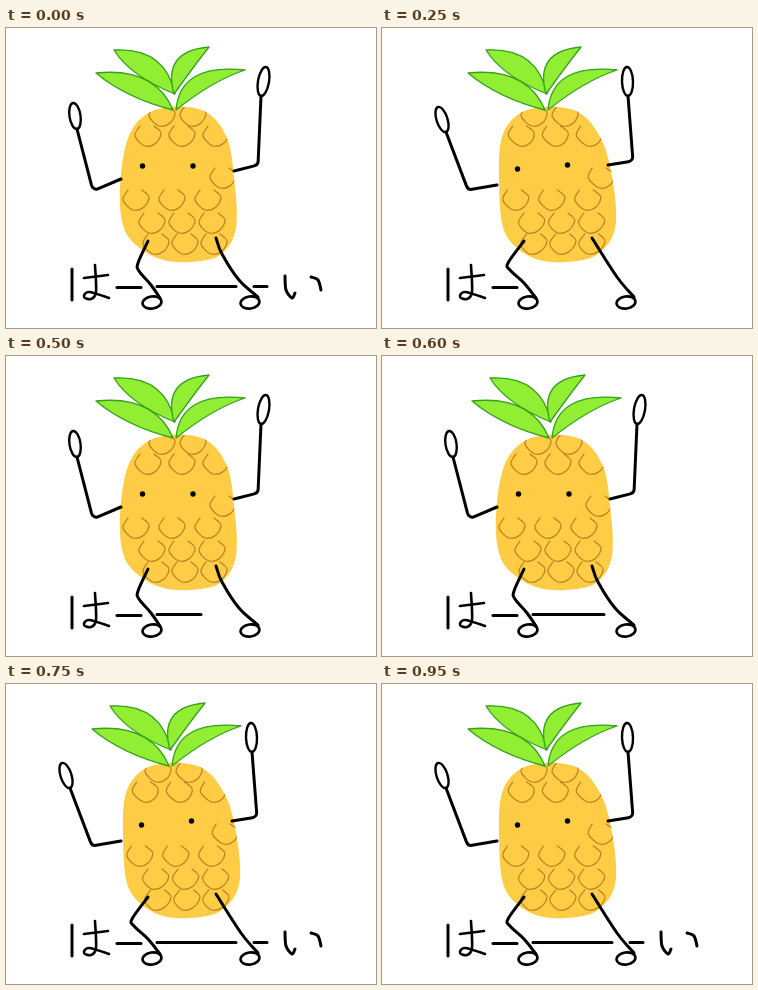
Recreate the animation shown at these times as an HTML page with a canvas. Size 370 px wide and 300 px high, loop 1000 ms.

```html
<!DOCTYPE html>
<html lang="ja">
<head>
<meta charset="utf-8">
<title>はーい</title>
<style>
html, body { margin: 0; width: 100%; height: 100%; overflow: hidden; background: #fff; }
canvas { display: block; }
</style>
</head>
<body>
<canvas id="stage" width="370" height="300" role="img" aria-label="はーい"></canvas>
<script>
const ctx = document.getElementById('stage').getContext('2d');
ctx.lineCap = ctx.lineJoin = 'round';

const INK = '#000', SKIN = '#ffcc46', SCALE = '#b98221', LEAF = '#92ee32', RIM = '#35a01f';

const points = s => s.split(' ').map(p => p.split(',').map(Number));

// Smooth curve through every point
function curve(pts, closed) {
  const n = pts.length;
  const at = i => closed ? pts[(i + n) % n] : pts[Math.max(0, Math.min(n - 1, i))];
  ctx.beginPath();
  ctx.moveTo(...pts[0]);
  for (let i = 0; i < (closed ? n : n - 1); i++) {
    const [a, b, c, d] = [at(i - 1), at(i), at(i + 1), at(i + 2)];
    ctx.bezierCurveTo(b[0] + (c[0] - a[0]) / 6, b[1] + (c[1] - a[1]) / 6,
      c[0] - (d[0] - b[0]) / 6, c[1] - (d[1] - b[1]) / 6, c[0], c[1]);
  }
}
function stroke(width = 3, color = INK) {
  ctx.lineWidth = width;
  ctx.strokeStyle = color;
  ctx.stroke();
}
function fill(color) {
  ctx.fillStyle = color;
  ctx.fill();
}
function line(s, width, color) {
  curve(points(s));
  stroke(width, color);
}
function oval(x, y, rx, ry, tilt = 0) {
  ctx.beginPath();
  ctx.ellipse(x, y, rx, ry, tilt, 0, 7);
}

// Leaning shifts the top to the left and the belly to the right
const lean = sway => ([x, y]) => [x - sway * 4 * Math.cos((y - 80) * Math.PI / 100), y];

const body = points('165,79 138,88 121,113 114,160 117,197 130,217 154,231 183,234 214,227 230,200 228,150 221,110 200,84');
const scale = points('-8,-9 -13,1 -3,11 8,8 13,-2 6,-9');
// Rows of scales: first x, y, spacing, count
const rows = [[156, 87, 31, 2], [142, 107, 34, 3], [217, 149, 0, 1], [130, 171, 36, 3], [146, 194, 30, 3], [150, 215, 29, 3]];

function drawBody(sway) {
  const bend = lean(sway);
  ctx.save();
  curve(body.map(bend), true);
  fill(SKIN);
  ctx.clip();
  for (const [x0, y0, gap, count] of rows)
    for (let i = 0; i < count; i++) {
      curve(scale.map(([x, y]) => bend([x0 + i * gap + x, y0 + y])));
      stroke(1.2, SCALE);
    }
  ctx.restore();
  for (const [x, y] of [[136.5 - sway, 138 + 3 * sway], [187 - 1.5 * sway, 138 - sway]]) {
    oval(x, y, 2.7, 2.7);
    fill(INK);
  }
}

// Pointed leaf from tip to base, one bend for each edge
function leaf(tip, base, upper, lower) {
  ctx.beginPath();
  ctx.moveTo(...tip);
  ctx.quadraticCurveTo(...upper, ...base);
  ctx.quadraticCurveTo(...lower, ...tip);
  fill(LEAF);
  stroke(1.3, RIM);
}
function drawLeaves(sway) {
  ctx.save();
  ctx.translate(-4 * sway, 0);
  leaf([108, 22], [169, 66], [159, 19], [124, 48]);
  leaf([203, 19], [168, 66], [156, 23], [188, 38]);
  leaf([90, 45], [167, 82], [149, 39], [120, 70]);
  leaf([239, 42], [170, 82], [174, 35], [206, 53]);
  ctx.restore();
}

function arm(shoulder, elbow, wrist, tip) {
  ctx.beginPath();
  ctx.moveTo(...shoulder);
  ctx.arcTo(...elbow, ...wrist, 5);
  ctx.lineTo(...wrist);
  stroke();
  const dx = tip[0] - wrist[0], dy = tip[1] - wrist[1];
  oval(wrist[0] + dx / 2, wrist[1] + dy / 2, Math.hypot(dx, dy) / 2, 5.5, Math.atan2(dy, dx));
  stroke(2.4);
}

function drawLimbs(sway) {
  if (sway) {
    arm([115, 157], [86, 162], [64, 104], [56, 79]);
    arm([226, 137], [251, 133], [246, 68], [245, 39]);
    line('142,213 126,235 128,242 142,255 154,270');
    line('210,210 235,249 252,269');
  } else {
    arm([115, 151], [87, 163], [71, 101], [67, 75]);
    arm([228, 143], [252, 137], [255, 68], [260, 39]);
    line('142,213 132,235 133,243 145,257 154,270');
    line('210,210 216,226 233,252 252,269');
  }
  for (const x of [146, 244]) {
    oval(x, 274.5, 9.5, 6, -0.15);
    stroke(2.6);
  }
}

// The word is written during the loop and stands complete at its turn
function drawWord(t) {
  if (t < 100) return;
  line('66,241 66,272');
  line('78,250 102,247', 2.6);
  line('89,237 90,264 85,271 78,269 83,264 103,270', 2.6);
  const end = t < 200 ? 0 : Math.max(136, 60 + 0.27 * t);
  for (const [a, b, y] of [[111, 135, 259.5], [151, 230, 258.5], [248, 261, 258.5]])
    if (end > a) line(`${a},${y} ${Math.min(b, end)},${y}`);
  if (t >= 700) line('279,248 280,262 286,270 289,265');
  if (t >= 750) line('305,249 312,252 315,262');
}

function frame(now) {
  const step = Math.floor(now / 50) % 20;
  const sway = step % 2;
  ctx.fillStyle = '#fff';
  ctx.fillRect(0, 0, 370, 300);
  drawBody(sway);
  drawLeaves(sway);
  drawWord(step * 50 || 1000);
  drawLimbs(sway);
}

let start;
function tick(now) {
  start ??= now;
  frame(now - start);
  requestAnimationFrame(tick);
}
frame(0);
requestAnimationFrame(tick);
</script>
</body>
</html>
```
